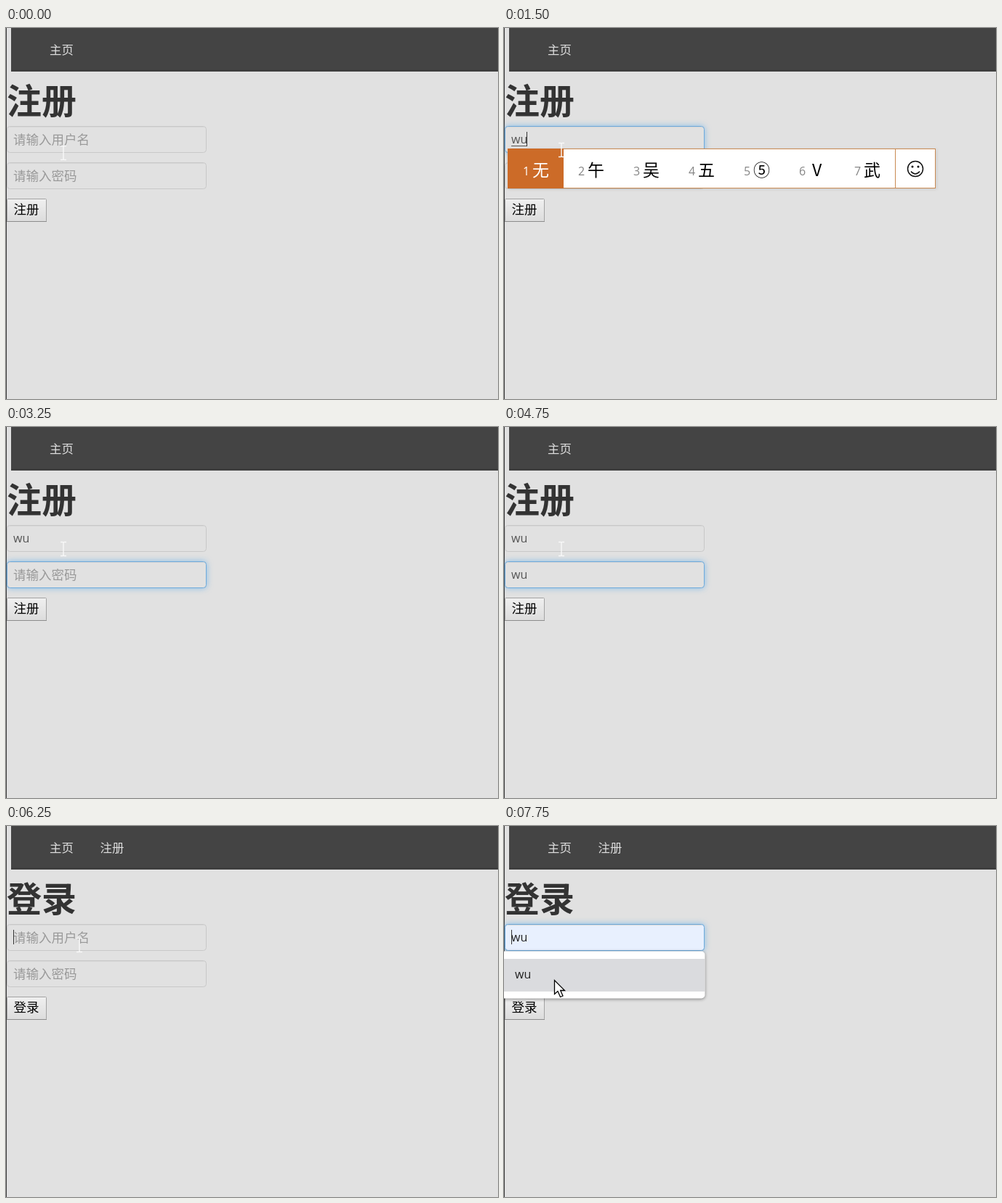
Write an HTML page that moves like this. It is 677 px wide and 511 px high and loops after 8000 ms.

```html
<!DOCTYPE html>
<html lang="zh-CN">
<head>
<meta charset="utf-8">
<title>注册与登录</title>
<style>
html, body { margin: 0; width: 100%; height: 100%; overflow: hidden; background: #e1e1e1; }
svg { display: block; width: 677px; height: 511px; }
text { font-family: "Noto Sans CJK SC", "Noto Sans CJK", sans-serif; font-size: 17.5px; white-space: pre; }
[data-at] { visibility: hidden; }
[data-at].on { visibility: visible; }
.nav { font-size: 16.4px; fill: #dedede; }
.title { font-size: 48px; font-weight: 700; fill: #333; }
.hint { fill: #999; }
.typed { font: 16px "Open Sans", "Noto Sans", sans-serif; fill: #555; }
.dark { fill: #222; }
.field { fill: #e1e1e1; stroke: #c8c8c8; }
.inset { fill: none; stroke: #d6d6d6; }
.focus { stroke: #6eaadb; filter: drop-shadow(0 0 4px rgba(82, 168, 236, .65)); }
.filled { fill: #e8f0fe; stroke: #6eaadb; }
.caret { stroke: #333; }
.list { fill: #fff; filter: drop-shadow(0 1px 2px rgba(0, 0, 0, .45)); }
.ime { filter: drop-shadow(1px 1px 2px rgba(0, 0, 0, .1)); }
.num { font: 16px "Open Sans", "Noto Sans", sans-serif; fill: #858585; }
.word { font-size: 23px; fill: #000; }
.pick { fill: #fff; }
</style>
</head>
<body>
<svg viewBox="0 0 677 511">
  <defs>
    <linearGradient id="face" x2="0" y2="1">
      <stop stop-color="#f0f0f0"/><stop offset="1" stop-color="#dcdcdc"/>
    </linearGradient>
    <g id="box">
      <rect x="1.5" y="135.5" width="274" height="36" rx="4"/>
      <path class="inset" d="M5 136.5H272"/>
    </g>
    <path id="bar" d="M.5 143V163"/>
  </defs>

  <rect width="677" height="511" fill="#e1e1e1"/>
  <path d="M.5 0V511" stroke="#3c3c3c"/>
  <rect x="7" width="670" height="60" fill="#444"/>
  <rect x="7" y="57" width="670" height="3" fill="#3f3f3f"/>
  <text class="nav" x="60" y="35.5">主页</text>
  <text class="nav" x="129.5" y="35.5" data-at="5750-8000">注册</text>
  <text class="title" x="1" y="118" data-at="0-5750">注册</text>
  <text class="title" x="1" y="118" data-at="5750-8000">登录</text>

  <use href="#box" class="field"/>
  <use href="#box" class="field" y="50"/>
  <use href="#box" class="field focus" data-at="500-3000 6500-8000"/>
  <use href="#box" class="field focus" y="50" data-at="3000-5500"/>
  <use href="#box" class="filled" data-at="7500-8000"/>

  <text class="hint" x="10" y="159.5" data-at="0-1500 5750-7500">请输入用户名</text>
  <text class="hint" x="10" y="209.5" data-at="0-4000 5750-8000">请输入密码</text>
  <text class="typed" x="10" y="159" data-at="1500-5750">wu</text>
  <text class="typed dark" x="10" y="159" data-at="7500-8000">wu</text>
  <text class="typed" x="10" y="209" data-at="4000-4250">w</text>
  <text class="typed" x="10" y="209" data-at="4250-5750">wu</text>
  <path d="M10 162.5H32" stroke="#555" data-at="1500-2500"/>

  <g class="caret">
    <use href="#bar" x="10" data-at="500-1000 6250-6750 7500-8000"/>
    <use href="#bar" x="31" data-at="1500-1750 2000-3000"/>
    <use href="#bar" x="10" y="50" data-at="3000-3250 3500-4000"/>
    <use href="#bar" x="23" y="50" data-at="4000-4250"/>
    <use href="#bar" x="31" y="50" data-at="4250-4750 5250-5500"/>
  </g>

  <rect x="1.5" y="235.5" width="54" height="31" rx="1" fill="url(#face)" stroke="#a3a3a3"/>
  <path d="M1 266.5H56" stroke="#8c8c8c"/>
  <rect x="2" y="236" width="53" height="30" fill="#d2d2d2" data-at="5500-5750"/>
  <text x="10.5" y="256" data-at="0-5750">注册</text>
  <text x="10.5" y="256" data-at="5750-8000">登录</text>

  <g data-at="7000-8000">
    <rect class="list" x="-5" y="172.5" width="281.5" height="65" rx="5"/>
  </g>
  <rect y="183" width="276" height="45" fill="#dadbde" data-at="7500-8000"/>
  <text class="typed dark" x="15" y="210" data-at="7000-8000">wu</text>

  <g data-at="1500-2500">
    <rect class="ime" x="5.5" y="166.5" width="588" height="54" fill="#fff" stroke="#c98a52"/>
    <rect x="5" y="166" width="77" height="55" fill="#cc6b28"/>
    <path d="M538.5 166V221" stroke="#c98a52"/>
    <g id="words"></g>
    <g fill="none" stroke="#111" stroke-width="1.5">
      <circle cx="566" cy="194" r="10.5"/>
      <path d="M560 197.5Q566 204.5 572 197.5"/>
    </g>
    <circle cx="562" cy="191" r="1.5"/>
    <circle cx="570" cy="191" r="1.5"/>
  </g>

  <g id="mouse">
    <path id="beam" d="M-4 -9.5H-1L0 -8.5L1 -9.5H4M0 -8.5V8.5M-4 9.5H-1L0 8.5L1 9.5H4"
      fill="none" stroke="#f8f8f8" stroke-width="1.4"/>
    <path id="arrow" d="M.5 .5V19.5L5 15.5L8.5 23.5L12 22L8.7 14.5H14.5Z"
      fill="#fff" stroke="#000" stroke-width="1.3"/>
  </g>
</svg>
<script>
const LOOP = 8000;
const $ = id => document.getElementById(id);

// Input method candidates, evenly spaced
$("words").innerHTML = [..."无午吴五⑤V武"].map((word, i) => {
  const x = 26 + i * 76, pick = i ? "" : " pick";
  return `<text class="num${pick}" x="${x}" y="203">${i + 1}</text>` +
    `<text class="word${pick}" x="${x + 24.5}" y="204" text-anchor="middle">${word}</text>`;
}).join("");

// Pointer stops: time, x, y, shape
const stops = [
  [0, 79, 172, "beam"], [250, 79, 168, "beam"],
  [5000, 62, 214, "beam"], [5250, 36, 261, "arrow"], [5750, 38, 243, "arrow"],
  [6000, 88, 196, "beam"], [6250, 101, 164, "beam"], [6500, 82, 160, "beam"],
  [6750, 60, 168, "beam"], [7000, 51, 180, "beam"],
  [7500, 66, 206, "arrow"], [7750, 69, 212, "arrow"]
];

const parts = [...document.querySelectorAll("[data-at]")].map(el => ({
  el, spans: el.dataset.at.split(" ").map(s => s.split("-").map(Number))
}));

function draw(now) {
  const t = now % LOOP;
  for (const { el, spans } of parts)
    el.classList.toggle("on", spans.some(([a, b]) => t >= a && t < b));
  const [, x, y, shape] = stops.findLast(s => s[0] <= t);
  $("mouse").setAttribute("transform", `translate(${x} ${y})`);
  for (const id of ["beam", "arrow"]) $(id).style.display = id === shape ? "" : "none";
}

const start = performance.now();
function tick() {
  draw(performance.now() - start);
  requestAnimationFrame(tick);
}
tick();
</script>
</body>
</html>
```
